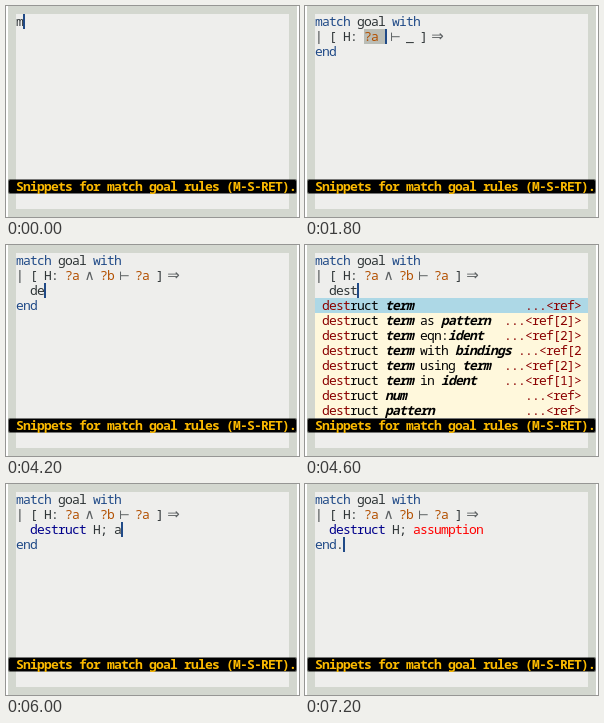
Animation of 293x211 px, one loop 9000 ms. Source, as an HTML page:

```html
<!DOCTYPE html>
<html lang="en">
<head>
<meta charset="utf-8">
<title>Match goal snippets</title>
<style>
  html, body { margin: 0; width: 100%; height: 100%; overflow: hidden; background: #fff; }
  #window { position: absolute; left: 2px; top: 0; width: 289px; height: 211px; background: #d3d7cf; }
  #buffer { position: absolute; left: 8px; top: 8px; width: 273px; height: 195px; background: #eeeeec; }
  #buffer, #caption {
    font: 13px/15px "Noto Sans Mono", "DejaVu Sans Mono", monospace;
    letter-spacing: calc(7px - 1ch);
    white-space: pre;
    color: #2e3436;
  }
  #caption {
    position: absolute; left: 0; top: 173px; box-sizing: border-box; width: 289px; height: 15px;
    padding-left: 7px; border: 1px solid rgba(0, 0, 0, .5); border-radius: 2px;
    background: #000 padding-box; color: #fcba00; font-weight: bold; line-height: 13px;
  }
  .line, .row { height: 15px; }
  .cursor { position: absolute; width: 2px; height: 15px; background: #204a87; }
  .field { display: inline-block; height: 15px; vertical-align: top; background: #babdb6; }
  .keyword { color: #204a87; }
  .variable { color: #b35000; }
  .tactic { color: #00008b; }
  .closer { color: #f00; }
  .symbol {
    display: inline-flex; justify-content: center; width: 7px;
    font: 200 12px/0 "DejaVu Sans", sans-serif; letter-spacing: 0;
  }
  .wedge { font-size: 14px; color: #5c6062; }
  .arrow { font-size: 15px; color: #5c6062; }
  .row { box-sizing: border-box; padding: 0 7px; background: #fff8dc; color: #000; }
  .row:first-child { background: #add8e6; }
  .row div { overflow: hidden; height: 15px; }
  .row b, .note { color: #8b0000; }
  .row b { font-weight: inherit; }
  .row em { font-weight: bold; }
</style>
</head>
<body>
<div id="window">
  <div id="buffer"></div>
  <div id="caption">Snippets for match goal rules (M-S-RET).</div>
</div>
<script>
const STEP = 200, LOOP = 9000;
const buffer = document.getElementById('buffer');

// Completion lists: "candidate|annotation", with *placeholders*.
const matchList = [
  'match goal with|...<ref>',
  'match *term* with|...<ref[2]>',
  'match reverse goal with|...<ref>',
  'match *term* as *ident*|...<ref>',
  'match *term* in *type*|...<ref>',
  'match *term* return *type*|...<ref>',
  'match *pattern* with|...<ref[2]>',
  'match *ident* with|...<ref[1]>',
  'match goal|...<ref>',
  '*match_rule*|...<ref>'
];
const destructList = [
  'destruct *term*|...<ref>',
  'destruct *term* as *pattern*|...<ref[2]>',
  'destruct *term* eqn:*ident*|...<ref[2]>',
  'destruct *term* with *bindings*|...<ref[2]>',
  'destruct *term* using *term*|...<ref[2]>',
  'destruct *term* in *ident*|...<ref[1]>',
  'destruct *num*|...<ref>',
  'destruct *pattern*|...<ref>'
];
const assertList = [
  'assumption|...<ref>',
  'assert (*ident* : *form*)|...<ref[2]>',
  'assert *form*|...<ref[1]>',
  'assert *form* by *tactic*|...<ref[2]>',
  'assert *form* as *intro_pattern*|...<ref[2]>',
  'assert *form* as *intro_pattern* by *tactic*|...<ref[2]>',
  'assert (*ident* := *term*)|...<ref[2]>',
  '*assumption_keyword* Inline *assums.*|...'
];

// ¦ is the cursor, « » enclose the active field.
const styles = [
  [/^(match|with|end)$/, 'keyword'],
  [/^\?/, 'variable'],
  [/^destruct$/, 'tactic'],
  [/^assumption$/, 'closer'],
  [/^⇒$/, 'symbol arrow'],
  [/^∧$/, 'symbol wedge'],
  [/^⊢$/, 'symbol']
];
const marks = { '¦': '<i class="cursor"></i>', '«': '<span class="field">', '»': '</span>' };
const tokens = /[¦«»∧⊢⇒]|\?\w+|\b(?:match|with|end|destruct|assumption)\b/g;

function lineHtml(line) {
  const html = line.replace(tokens, token => marks[token] ||
    `<span class="${styles.find(([test]) => test.test(token))[1]}">${token}</span>`);
  return `<div class="line">${html}</div>`;
}

function rowHtml(entry, prefix, columns) {
  const [text, note] = entry.split('|');
  const length = text.replaceAll('*', '').length;
  const gap = ' '.repeat(Math.max(1, columns - length - note.length));
  const label = text.replace(prefix, `<b>${prefix}</b>`).replace(/\*(.+?)\*/g, '<em>$1</em>');
  return `<div class="row" style="width:${(columns + 2) * 7}px"><div>${label}${gap}` +
    `<span class="note">${note.replace('<', '&lt;')}</span></div></div>`;
}

const states = [];
function show(text, steps = 1, list = null, prefix = '', columns = 37) {
  let html = text.split('\n').map(lineHtml).join('');
  if (list) html += `<div>${list.map(entry => rowHtml(entry, prefix, columns)).join('')}</div>`;
  for (let i = 0; i < steps; i++) states.push(html);
}
function type(keys, wrap) {
  for (let i = 1; i <= keys.length; i++) show(wrap(keys.slice(0, i).replace('/\\', '∧')));
}

const head = 'match goal with\n';
const rule = (hyp, goal, rest = '') => `${head}| [ ${hyp} ⊢ ${goal} ] ⇒${rest}`;
const body = (text, end = '\nend') => rule('H: ?a ∧ ?b', '?a', `\n  ${text}${end}`);

type('ma', s => s + '¦');
show('mat¦', 2, matchList, 'mat', 32);
show(head + '  ¦\nend');
show(rule('«¦H»: _', '_', '\nend'));
show(rule('H: «¦_»', '_', '\nend'));
type('?a /\\ ?b', s => rule(`H: «${s}¦»`, '_', '\nend'));
show(rule('H: ?a ∧ ?b', '«¦_»', '\nend'));
type('?a', s => rule('H: ?a ∧ ?b', `«${s}¦»`, '\nend'));
show(rule('H: ?a ∧ ?b', '?a', ' ¦\nend'));
show(body('¦'));
type('de', s => body(s + '¦'));
for (const [prefix, steps] of [['des', 1], ['dest', 1], ['destr', 2]])
  show(body(prefix + '¦', ''), steps, destructList, prefix);
show(body('destruct «¦term»'));
show(body('destruct «H¦»'));
type('; as', s => body(`destruct H${s}¦`));
show(body('destruct H; ass¦', ''), 2, assertList, 'ass');
show(body('destruct H; assumption¦'));
show(body('destruct H; assumption', '\nend¦'));
show(body('destruct H; assumption', '\nend.¦'));

let current = -1;
const start = performance.now();
function draw() {
  const time = (performance.now() - start) % LOOP;
  const index = Math.min(Math.floor(time / STEP), states.length - 1);
  if (index !== current) buffer.innerHTML = states[current = index];
  requestAnimationFrame(draw);
}
draw();
</script>
</body>
</html>
```
